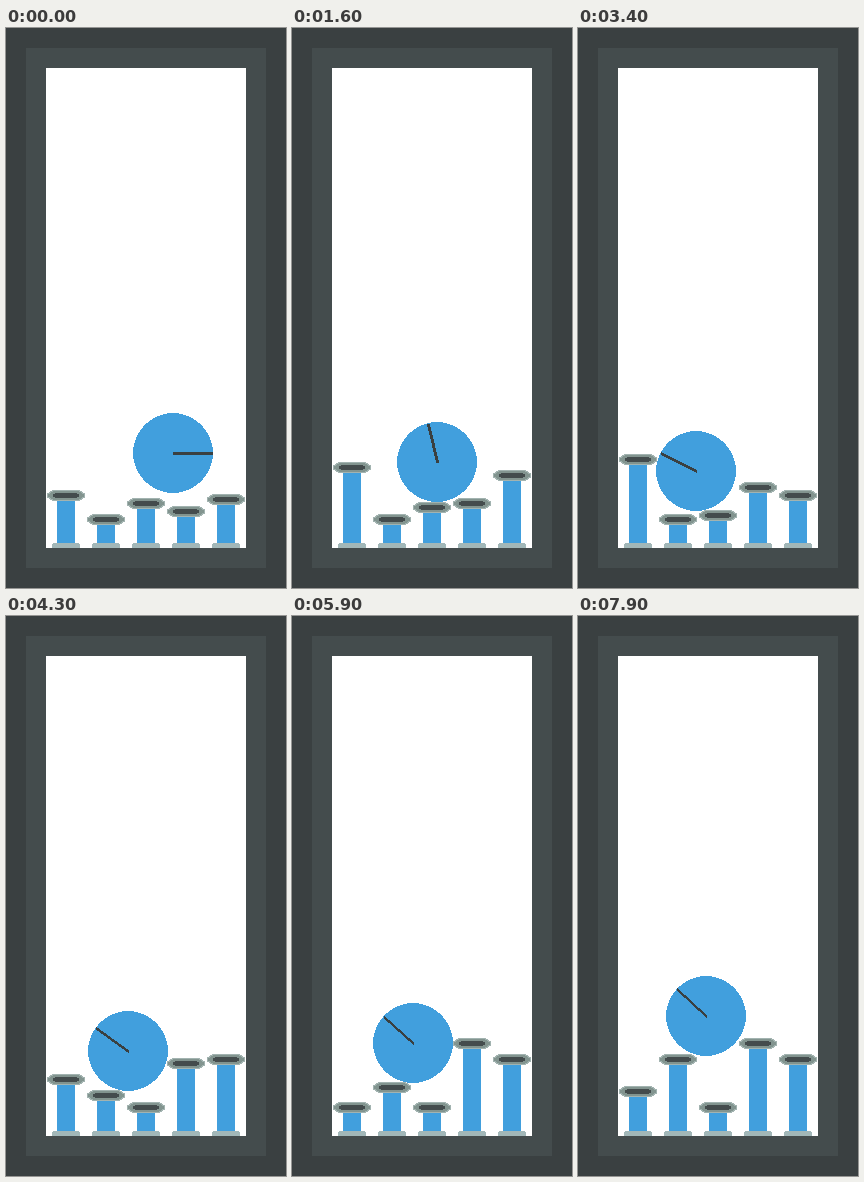
An HTML page with a canvas that plays this animation: 280x560 px, repeating every 8000 ms.

```html
<!DOCTYPE html>
<html lang="en">
<head>
<meta charset="utf-8">
<title>Pistons and ball</title>
<style>
html, body { margin: 0; width: 100%; height: 100%; overflow: hidden; background: #3a4041; }
canvas { display: block; }
</style>
</head>
<body>
<canvas id="stage" width="280" height="560"></canvas>
<script>
const ctx = document.getElementById('stage').getContext('2d');
const LOOP = 8000, STEP = 100, R = 40;
const DARK = '#3a4041', WALL = '#444c4d', BLUE = '#419fdd';

// Turning points of each piston: [step, level], one level is 4 px
const pistons = [
  [[0, 6], [9, 11], [24, 16], [34, 15], [50, 0], [75, 0], [79, 4]],
  [[0, 0], [18, 0], [25, 7], [27, 6], [33, 0], [40, 0], [49.5, 9], [57, 3], [60, 6], [64, 6],
   [68, 8], [72, 10], [75, 13], [79, 12]],
  [[0, 4], [8, 0], [13, 0], [17, 4], [27, 4], [34, 1], [38, 0]],
  [[0, 2], [9, 3], [24, 6], [34, 8], [51, 13], [58, 16]],
  [[0, 5], [9, 6], [20, 14], [26, 14], [34, 6], [44, 13], [51, 12], [68, 11], [79, 12]]
];

// Where the ball rolls to: [step, x, degrees]; its height follows from the pistons
const roll = [
  [0, 167, 0], [9, 166, -69], [24, 120, -144], [34, 118, -153],
  [51, 126, -137], [60, 121, -138], [68, 121, -138], [79, 128, -137]
];

const linear = p => p;
const smooth = p => p * p * (3 - 2 * p);

function sample(keys, t, col, ease) {
  const i = keys.findIndex(k => k[0] > t);
  if (i < 0) return keys[keys.length - 1][col];
  const a = keys[i - 1], b = keys[i];
  return a[col] + (b[col] - a[col]) * ease((t - a[0]) / (b[0] - a[0]));
}

// Height at which the ball lies on the heads below it, after the first drop
function restY(x, heads, t) {
  const reach = R + 1, half = 20;
  let y = 425 + t * t / 2;
  for (const [hx, hy] of heads) {
    const gap = Math.max(0, Math.abs(x - hx) - half);
    if (gap < half) y = Math.min(y, hy - 3 - Math.sqrt(reach * reach - gap * gap));
  }
  return Math.round(y);
}

function rect(color, x, y, w, h) {
  ctx.fillStyle = color;
  ctx.fillRect(x, y, w, h);
}

// Bar with slanted, blunt ends
function bar(color, cx, cy, half, up, cut) {
  for (let i = -up; i <= up; i++) {
    const inset = Math.round(1.7 * Math.max(0, cut - up + Math.abs(i)));
    rect(color, cx - half + inset, cy + i, 2 * (half - inset), 1);
  }
}

function drawHead(x, y) {
  bar('#a2b3b0', x, y, 19, 5, 3);
  bar('#82948f', x, y, 18, 4, 3);
  bar('#444c4d', x, y, 13, 2, 1);
}

function drawDisc(x, y) {
  for (let a = 1; a < R; a++) {
    const b = Math.round(Math.sqrt(R * R - a * a));
    rect(BLUE, x - b, y - a, 2 * b, 2 * a);
    rect(BLUE, x - a, y - b, 2 * a, 2 * b);
  }
}

function drawSpoke(x, y, deg) {
  const a = deg * Math.PI / 180;
  const dx = Math.round((R - 1) * Math.cos(a)), dy = Math.round((R - 1) * Math.sin(a));
  const flat = Math.abs(dx) > Math.abs(dy);
  const n = Math.max(Math.abs(dx), Math.abs(dy));
  for (let i = 0; i <= n; i++) {
    const px = x + Math.round(dx * i / n), py = y + Math.round(dy * i / n);
    if (flat) rect(DARK, px, py - 1, 1, 3);
    else rect(DARK, px - 1, py, 3, 1);
  }
}

function draw(t) {
  rect(DARK, 0, 0, 280, 560);
  rect(WALL, 20, 20, 240, 520);
  rect('#fff', 40, 40, 200, 480);

  const heads = pistons.map((keys, i) => [60 + 40 * i, 491 - 4 * Math.round(sample(keys, t, 1, linear))]);
  for (const [x, y] of heads) {
    rect(BLUE, x - 9, y, 18, 515 - y);
    rect('#a2b7b8', x - 13, 515, 26, 1);
    rect('#a2b7b8', x - 14, 516, 28, 4);
  }

  const x = Math.round(sample(roll, t, 1, smooth));
  const y = restY(x, heads, t);
  drawDisc(x, y);
  drawSpoke(x, y, sample(roll, t, 2, smooth));
  for (const head of heads) drawHead(...head);
}

function tick() {
  draw(Math.floor(performance.now() % LOOP / STEP));
  requestAnimationFrame(tick);
}
tick();
</script>
</body>
</html>
```
